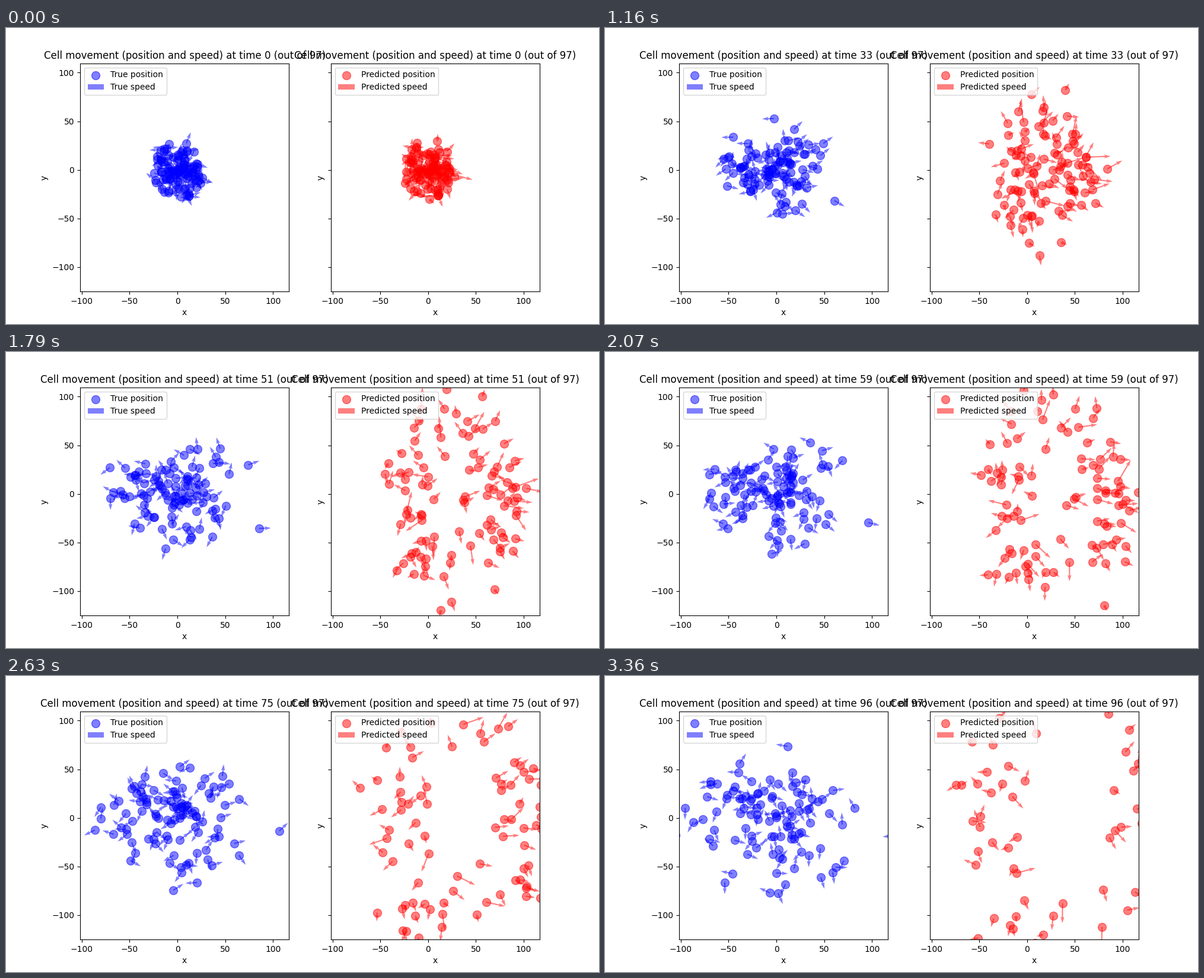
Animation of 1000x500 px, one loop 3.39 s. Source, as a matplotlib script:

```python
import matplotlib.pyplot as plt
import numpy as np
from matplotlib.animation import FuncAnimation

STEPS = 97          # simulated time steps
STEP_MS = 35
LOOP_MS = 3390
INTERVAL = 15
N_CELLS = 100
ARROW = 20          # usual arrow length in pixels

rng = np.random.default_rng(7)
t = np.arange(STEPS)


def unit(angle):
    return np.stack([np.cos(angle), np.sin(angle)], axis=-1)


def disc(n, radius):
    """Random points in a disc, denser in the middle."""
    r = radius * rng.random(n) ** 0.7
    return r[:, None] * unit(rng.uniform(0, 2 * np.pi, n)) + [1, 0]


def walk(start, speed=1.65, turn=0.55):
    """Constant speed with a wandering heading, a little flatter than wide."""
    n = len(start)
    turns = rng.normal(0, turn, (STEPS, n))
    heading = rng.uniform(0, 2 * np.pi, n) + np.cumsum(turns, axis=0)
    moves = speed * unit(heading)
    steps = moves * [1, 0.8] + [0, 0.08]
    return start + np.cumsum(steps, axis=0) - steps[0], moves


def burst(start):
    """A ring that opens towards the right, with a smooth wobble per cell."""
    n = len(start)
    u = rng.uniform(-1, 1, n)
    angle = np.pi * np.sign(u) * np.abs(u) ** 1.4
    pace = rng.uniform(0.7, 1.3, (n, 1))
    vel = [0.45, 0] + pace * unit(angle) * [0.95, 1.5]
    freq = 2 * np.pi / rng.uniform(30, 60, (n, 2))
    phase = rng.uniform(0, 2 * np.pi, (n, 2))
    time = t[:, None, None]
    wobble = 6 * (np.sin(freq * time + phase) - np.sin(phase))
    return start + vel * time + wobble


def arrows(vel, size):
    length = np.maximum(np.linalg.norm(vel, axis=-1, keepdims=True), 1e-9)
    return size * vel / length


start = disc(N_CELLS, 29)
true_pos, moves = walk(start)
true_vel = arrows(moves, ARROW)

pred_pos = burst(start + rng.normal(0, 1.5, start.shape))
pred_size = ARROW * rng.lognormal(0, 0.35, (N_CELLS, 1))
pred_vel = arrows(np.gradient(pred_pos, axis=0), pred_size)

fig, axes = plt.subplots(1, 2, figsize=(10, 5), dpi=100, sharex=True, sharey=True)
axes[0].set_xlim(-101.8, 116.8)
axes[0].set_ylim(-125, 109.4)


def make_panel(ax, name, color, pos, vel):
    dots = ax.scatter(*pos[0].T, s=100, color=color, alpha=0.5,
                      label=f"{name} position")
    quiver = ax.quiver(*pos[0].T, *vel[0].T, color=color, alpha=0.5,
                       scale=1, scale_units="dots", label=f"{name} speed")
    ax.set_xlabel("x")
    ax.set_ylabel("y")
    ax.legend(loc="upper left")
    return ax, dots, quiver, pos, vel


panels = [
    make_panel(axes[0], "True", "blue", true_pos, true_vel),
    make_panel(axes[1], "Predicted", "red", pred_pos, pred_vel),
]


def update(frame):
    step = min(int((frame + 0.5) * INTERVAL // STEP_MS), STEPS - 1)
    for ax, dots, quiver, pos, vel in panels:
        dots.set_offsets(pos[step])
        quiver.set_offsets(pos[step])
        quiver.set_UVC(*vel[step].T)
        ax.set_title("Cell movement (position and speed) "
                     f"at time {step} (out of {STEPS})")


anim = FuncAnimation(fig, update, frames=LOOP_MS // INTERVAL,
                     interval=INTERVAL, repeat=True, repeat_delay=0)
plt.show()
```
